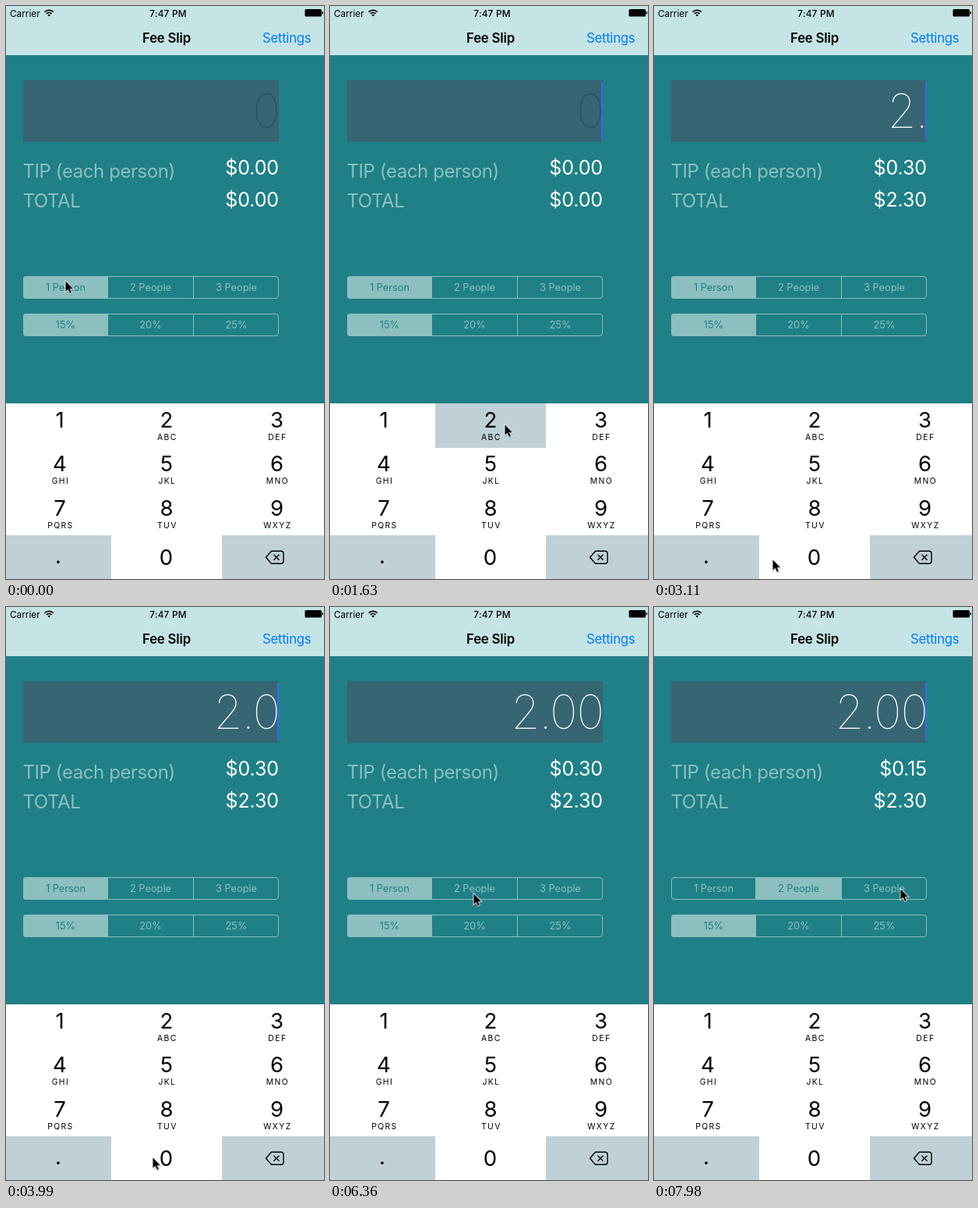
Write an HTML page that moves like this. It is 408 px wide and 734 px high and loops after 8 s.

```html
<!DOCTYPE html>
<html lang="en">
<head>
<meta charset="utf-8">
<title>Tip screen</title>
<style>
html, body { margin: 0; width: 100%; height: 100%; overflow: hidden; background: #1f8087; }
svg { display: block; width: 100%; height: 100%; font-family: Inter, Roboto, sans-serif; }
.mid { text-anchor: middle; }
.end { text-anchor: end; }
.label { font-size: 24px; letter-spacing: -.42px; fill: #8dbfc0; }
.money { font-size: 25px; letter-spacing: -.1px; fill: #fff; }
.amount { font-size: 60px; font-weight: 100; letter-spacing: -1px; fill: #fff; }
.seg { font-size: 12.8px; fill: #8dbfc0; }
.digit { font-size: 27.6px; }
.abc { font-size: 10.4px; letter-spacing: 1.4px; }
.anim, .anim * { animation: 8s step-end infinite; }
.show > * { opacity: 0; }

#a0 { animation-name: a0; }
#a1 { animation-name: a1; }
#a2 { animation-name: a2; }
#a3 { animation-name: a3; }
#a4 { animation-name: a4; }
#tip0, #sum0 { animation-name: a0; }
#tip1 { animation-name: tip1; }
#tip2 { animation-name: tip2; }
#sum1 { animation-name: sum1; }
@keyframes a0 { 0% { opacity: 1 } 24.125% { opacity: 0 } }
@keyframes a1 { 24.125% { opacity: 1 } 35.125% { opacity: 0 } }
@keyframes a2 { 35.125% { opacity: 1 } 49.875% { opacity: 0 } }
@keyframes a3 { 49.875% { opacity: 1 } 57.375% { opacity: 0 } }
@keyframes a4 { 57.375% { opacity: 1 } }
@keyframes tip1 { 24.125% { opacity: 1 } 85.125% { opacity: 0 } }
@keyframes tip2 { 85.125% { opacity: 1 } }
@keyframes sum1 { 24.125% { opacity: 1 } }

#caret { animation-name: blink; }
@keyframes blink {
  0%, 11.25%, 24.125%, 44.375%, 64.75%, 77.625%, 90.625% { opacity: 0 }
  1.875%, 14.875%, 27.75%, 48.125%, 68.5%, 81.375%, 94.375% { opacity: 1 }
}

#key2 { animation-name: key2; }
#keyDot { animation-name: keyDot; }
#key0 { animation-name: key0; }
@keyframes key2 { 20.375% { fill: #c0d0d7 } 24.125% { fill: #fff } }
@keyframes keyDot { 33.25% { fill: #fff } 35.125% { fill: #c0d0d7 } }
@keyframes key0 { 48.125%, 55.5% { fill: #c0d0d7 } 49.875%, 57.375% { fill: #fff } }

#one { fill: #8dbfc0; animation-name: one; }
#oneText { fill: #1f8087; animation-name: oneText; }
#two { fill: #1f8087; animation-name: two; }
#twoText { fill: #8dbfc0; animation-name: twoText; }
@keyframes one { 85.125% { fill: #1f8087 } }
@keyframes oneText { 85.125% { fill: #8dbfc0 } }
@keyframes two { 83.25% { fill: #40939a } 85.125% { fill: #8dbfc0 } }
@keyframes twoText { 85.125% { fill: #1f8087 } }

#pointer { animation-name: point; }
@keyframes point {
  0% { transform: translate(76px, 351px) }
  1.875% { transform: translate(92px, 420px) }
  3.75% { transform: translate(115px, 504px) }
  9.375% { transform: translate(140px, 512px) }
  11.25% { transform: translate(190px, 528px) }
  13.125% { transform: translate(224px, 535px) }
  27.75% { transform: translate(190px, 580px) }
  29.625% { transform: translate(112px, 666px) }
  31.5% { transform: translate(72px, 706px) }
  37% { transform: translate(96px, 710px) }
  38.875% { transform: translate(152px, 708px) }
  40.625% { transform: translate(176px, 706px) }
  42.5% { transform: translate(188px, 704px) }
  64.75% { transform: translate(182px, 670px) }
  66.625% { transform: translate(158px, 560px) }
  68.5% { transform: translate(146px, 450px) }
  70.25% { transform: translate(158px, 392px) }
  72.125% { transform: translate(176px, 375px) }
  75.75% { transform: translate(184px, 366px) }
  87% { transform: translate(187px, 371px) }
  88.75% { transform: translate(189px, 374px) }
  94.375% { transform: translate(210px, 373px) }
  96.25% { transform: translate(290px, 367px) }
  98.125% { transform: translate(353px, 362px) }
  99.75%, 100% { transform: translate(316px, 360px) }
}
</style>
</head>
<body>
<svg viewBox="0 0 408 734">
  <rect width="408" height="734" fill="#1f8087"/>
  <rect width="408" height="63" fill="#c5e4e5"/>

  <g font-size="11.8">
    <text x="5" y="14">Carrier</text>
    <text class="mid" x="208" y="14" font-weight="500" letter-spacing=".2">7:47 PM</text>
    <g fill="none" stroke="#000" stroke-width="1.7">
      <path d="M49.6 7.6a8 8 0 0 1 11.2 0M51.8 9.9a5 5 0 0 1 6.8 0"/>
      <path d="M55.2 13.6l-1.9-2a2.8 2.8 0 0 1 3.8 0z" fill="#000" stroke="none"/>
    </g>
    <rect x="383.5" y="4" width="21.5" height="9.5" rx="1.5"/>
    <rect x="405.5" y="7" width="1.5" height="3.5" rx=".7"/>
  </g>
  <text class="mid" x="206" y="47" font-size="16.8" font-weight="600" letter-spacing="-.2">Fee Slip</text>
  <text class="end" x="391.3" y="47" font-size="16.8" letter-spacing="-.3" fill="#007aff">Settings</text>

  <rect x="22" y="95" width="328" height="79" fill="#376573"/>
  <g class="amount end anim show">
    <text id="a0" x="351" y="156" fill="#2a4f5d">0</text>
    <text id="a1" x="351" y="156">2</text>
    <text id="a2" x="351" y="156">2.</text>
    <text id="a3" x="351" y="156">2.0</text>
    <text id="a4" x="351" y="156">2.00</text>
  </g>
  <g class="anim"><rect id="caret" x="348" y="97" width="2" height="74" fill="#3b6bea"/></g>

  <text class="label" x="21.5" y="220">TIP (each person)</text>
  <text class="label" x="21.5" y="258">TOTAL</text>
  <g class="money end anim show">
    <text id="tip0" x="350" y="216">$0.00</text>
    <text id="tip1" x="350" y="216">$0.30</text>
    <text id="tip2" x="350" y="216">$0.15</text>
    <text id="sum0" x="350" y="256.5">$0.00</text>
    <text id="sum1" x="350" y="256.5">$2.30</text>
  </g>

  <clipPath id="round"><rect x="22" y="346" width="328" height="29" rx="4"/></clipPath>
  <g class="seg mid anim">
    <g clip-path="url(#round)">
      <rect id="one" x="22" y="346" width="109" height="29"/>
      <rect id="two" x="131" y="346" width="109.5" height="29"/>
    </g>
    <text id="oneText" x="76.5" y="365">1 Person</text>
    <text id="twoText" x="185.5" y="365">2 People</text>
    <text x="295.5" y="365">3 People</text>
  </g>
  <g class="seg mid">
    <path d="M131 394H26a4 4 0 0 0-4 4v21a4 4 0 0 0 4 4h105z"/>
    <text x="76.5" y="413" fill="#1f8087">15%</text>
    <text x="185.5" y="413">20%</text>
    <text x="295.5" y="413">25%</text>
  </g>
  <g fill="none" stroke="#8dbfc0">
    <rect x="22.5" y="346.5" width="327" height="28" rx="3.5"/>
    <rect x="22.5" y="394.5" width="327" height="28" rx="3.5"/>
    <path d="M130.5 346v29M240.5 346v29M130.5 394v29M240.5 394v29"/>
  </g>

  <rect y="509" width="408" height="225" fill="#fff"/>
  <g class="anim">
    <rect id="key2" x="135" y="509" width="142" height="57" fill="#fff"/>
    <rect id="keyDot" y="678" width="135" height="56" fill="#c0d0d7"/>
    <rect id="key0" x="135" y="678" width="142" height="56" fill="#fff"/>
    <rect x="277" y="678" width="131" height="56" fill="#c0d0d7"/>
  </g>
  <g id="keys" class="mid"></g>
  <g fill="none" stroke="#000" stroke-width="1.4" stroke-linejoin="round">
    <path d="M333.5 706.2l7-8h12.5q3 0 3 3v10q0 3-3 3h-12.5z"/>
    <path d="M343.5 702.7l7 7m0-7l-7 7"/>
  </g>

  <g class="anim">
    <g id="pointer">
      <g transform="translate(.5 1.5) scale(.83)">
        <path d="M0 0v16l3.8-3.5 2.6 6 2.6-1.1-2.6-5.8h5.1z" transform="translate(.6 1.4)" stroke="#000" stroke-width="2" opacity=".18"/>
        <path d="M0 0v16l3.8-3.5 2.6 6 2.6-1.1-2.6-5.8h5.1z" stroke="#fff" stroke-width="2" paint-order="stroke"/>
      </g>
    </g>
  </g>
</svg>
<script>
const keys = document.getElementById('keys');
const columns = [69, 206, 347.5];
const letters = ['', 'ABC', 'DEF', 'GHI', 'JKL', 'MNO', 'PQRS', 'TUV', 'WXYZ'];

function addText(text, x, y, cls) {
  const el = document.createElementNS('http://www.w3.org/2000/svg', 'text');
  el.setAttribute('x', x);
  el.setAttribute('y', y);
  el.setAttribute('class', cls);
  el.textContent = text;
  keys.append(el);
}

letters.forEach((abc, i) => {
  const x = columns[i % 3], y = 540 + Math.floor(i / 3) * 56.4;
  addText(i + 1, x, y, 'digit');
  if (abc) addText(abc, x + .9, y + 15.7, 'abc');
});
addText('.', 67, 714, 'digit');
addText('0', 205.5, 716, 'digit');
</script>
</body>
</html>
```
